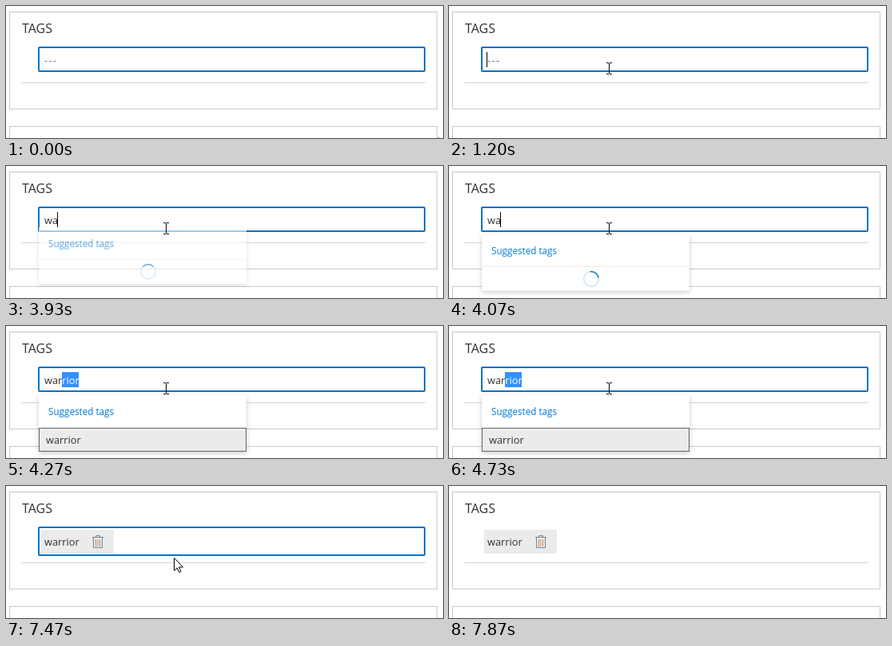
These frames come from a looping animation (547x166 px, 9190 ms). An HTML page:

```html
<!DOCTYPE html>
<html lang="en">
<head>
<meta charset="utf-8">
<title>Tag picker</title>
<style>
  html, body { margin: 0; width: 100%; height: 100%; overflow: hidden; background: #fff; }
  svg { display: block; width: 547px; height: 166px; font: 12.8px "Open Sans", "Noto Sans", sans-serif; fill: #323130; }
  .card { fill: #fff; stroke: #c8c8c8; }
  .frame { fill: #fff; stroke: #0072c6; stroke-width: 2; }
  .sheet { fill: #fff; filter: drop-shadow(0 2px 3px rgba(0, 0, 0, .2)); }
  .line { fill: none; stroke: #000; }
</style>
</head>
<body>
<svg viewBox="0 0 547 166">
  <rect class="card" x="4.5" y="7.5" width="535" height="122"/>
  <rect class="card" x="4.5" y="151.5" width="535" height="40"/>
  <text x="20" y="34" font-size="16">TAGS</text>
  <path d="M19 96.5H525" stroke="#d6d6d6"/>

  <rect id="frame" class="frame" x="41" y="52" width="483" height="30" rx="1"/>
  <text id="placeholder" x="48" y="73" fill="#767676" letter-spacing="1.4">---</text>
  <rect id="highlight" y="58" height="19" fill="#3390ff"/>
  <text x="48" y="73"><tspan id="typed"></tspan><tspan id="completion" fill="#fff"></tspan></text>
  <rect id="caret" y="58" width="1" height="19" fill="#000"/>

  <g id="tag">
    <rect x="44" y="55" width="91" height="30" rx="2" fill="#ebebeb"/>
    <text x="48" y="75">warrior</text>
    <path d="M108 64.5H122M112.5 64V62.5H117.5V64M109.5 65V77.5H120.5V65" fill="none" stroke="#6f8296"/>
    <path d="M112.5 67V76M115 67V76M117.5 67V76" stroke="#c58a62"/>
  </g>

  <g id="popup">
    <rect class="sheet" x="41" y="87" width="260" height="71"/>
    <text x="53" y="112" font-size="11.7" fill="#0078d4">Suggested tags</text>
    <g id="loading" fill="none">
      <path d="M41 127.5H301" stroke="#edebe9"/>
      <circle cx="178" cy="143" r="9.25" stroke="#c7e0f4" stroke-width="1.5"/>
      <path id="arc" d="M171.5 136.5A9.25 9.25 0 0 1 184.5 136.5" stroke="#0078d4" stroke-width="1.5"/>
    </g>
    <g id="result">
      <rect x="41.5" y="128.5" width="259" height="29" fill="#edebe9" stroke="#666"/>
      <text x="50" y="148">warrior</text>
    </g>
  </g>

  <path id="beam" class="line" d="M-3 -6.5H0M1 -6.5H4M.5 -6V7M-3 7.5H0M1 7.5H4"/>
  <path id="arrow" d="M.5 .5V16.5L4.2 13L6.7 18.5L9 17.5L6.6 12H11.5Z" fill="#fff" stroke="#000"/>
</svg>
<script>
const LOOP = 9190, TICK = 1000 / 15, WORD = "warrior";
const el = Object.fromEntries([...document.querySelectorAll("[id]")].map(e => [e.id, e]));
const show = (e, on) => e.setAttribute("display", on ? "inline" : "none");
const within = (k, from, to) => k >= from && k < to;

// Pointer position at tick k, or null while it is off stage.
function pointerAt(k) {
  if (k < 1) return [541, 165];
  if (k < 8) return null;
  if (k < 112) {
    const left = (1 - Math.min(1, (k - 8) / 5)) ** 2;
    return [200 + 67 * left, 78 + 68 * left];
  }
  if (k > 115) return null;
  const u = (k - 111) / 5;
  return [200 + 50 * u, 78 + 100 * u ** 1.3];
}

function drawPointer(k) {
  const pos = pointerAt(k);
  const overInput = pos && pos[1] < 86;
  show(el.beam, overInput);
  show(el.arrow, pos && !overInput);
  if (pos) {
    const move = `translate(${pos.map(Math.round)})`;
    el.beam.setAttribute("transform", move);
    el.arrow.setAttribute("transform", move);
  }
}

function drawInput(k) {
  const typing = within(k, 53, 91), completed = within(k, 63, 91), tagged = k >= 94;
  const letters = !typing ? 0 : k < 59 ? 1 : k < 64 ? 2 : 3;
  el.typed.textContent = WORD.slice(0, letters);
  el.completion.textContent = completed ? WORD.slice(letters) : "";
  const typedWidth = letters ? el.typed.getComputedTextLength() : 0;

  show(el.placeholder, !typing && !tagged);
  show(el.highlight, completed);
  el.highlight.setAttribute("x", Math.round(48 + typedWidth));
  el.highlight.setAttribute("width", completed ? Math.round(el.completion.getComputedTextLength()) : 0);

  const blinkOn = within(k, 18, 53) && (k - 18) % 16 < 8;
  show(el.caret, blinkOn || within(k, 53, 63) || within(k, 91, 94));
  el.caret.setAttribute("x", letters ? Math.round(47.4 + typedWidth) : 47);

  show(el.tag, tagged);
  show(el.frame, k < 118);
  el.frame.setAttribute("height", tagged ? 35 : 30);
}

function drawPopup(k) {
  const left = (1 - Math.min(1, Math.max(0, (k - 59) / 5.5))) ** 5;
  const loading = k < 63 || within(k, 69, 71);
  show(el.popup, within(k, 59, 91));
  el.popup.setAttribute("transform", `translate(0 ${-10 * left})`);
  el.popup.setAttribute("opacity", 1 - .38 * left);
  show(el.loading, loading);
  show(el.result, !loading);
  const start = k < 69 ? 59 : 69;
  el.arc.setAttribute("transform", `rotate(${(k - start) * TICK / 1300 * 360} 178 143)`);
}

function render(now) {
  const k = Math.floor((now % LOOP + 4) / TICK);
  drawPointer(k);
  drawInput(k);
  drawPopup(k);
}

const began = performance.now();
function loop() {
  render(performance.now() - began);
  requestAnimationFrame(loop);
}
loop();
</script>
</body>
</html>
```
